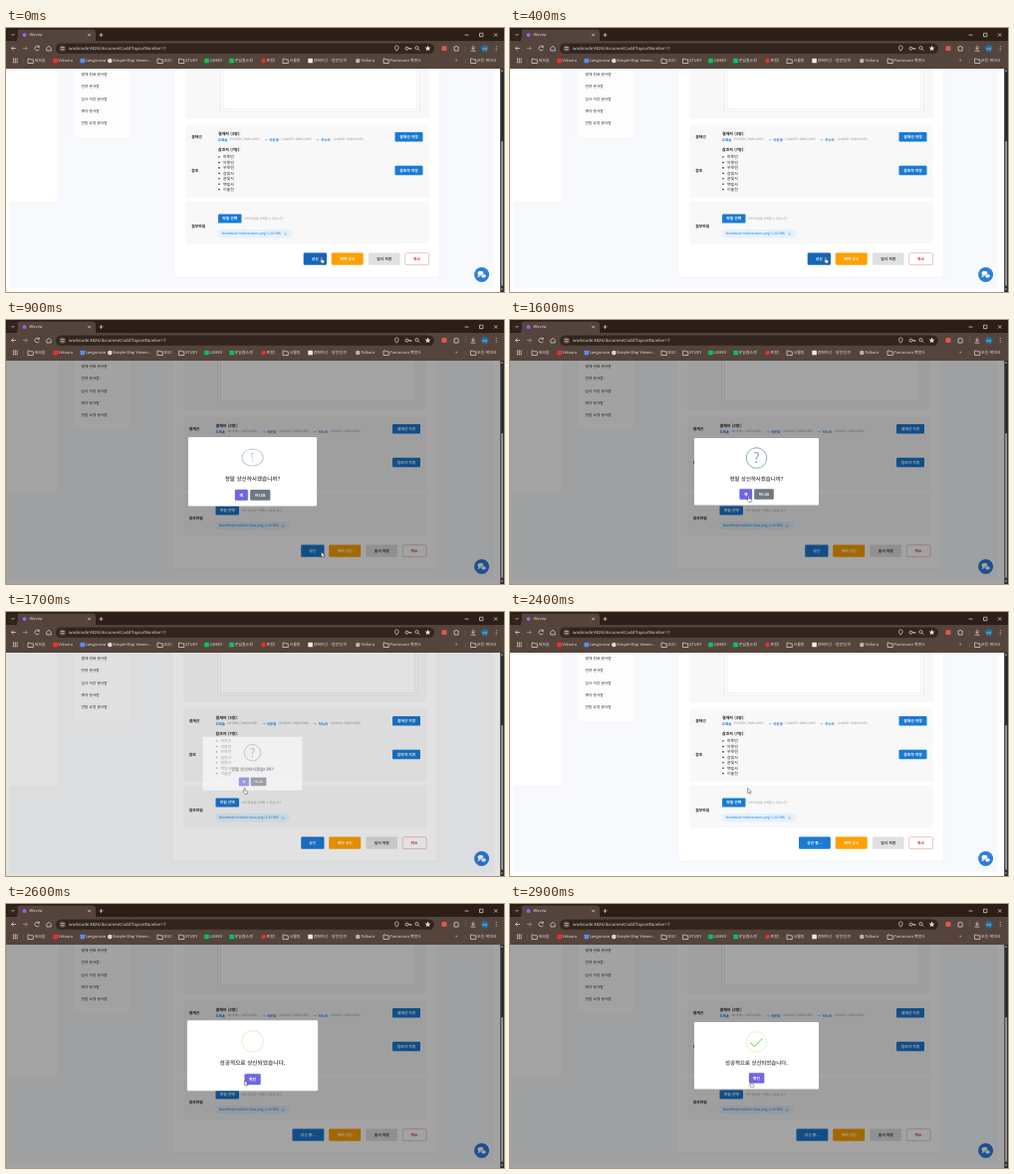
Recreate the animation shown at these times as an HTML page. Size 500 by 266 pixels, loop 3 s.

```html
<!DOCTYPE html>
<html lang="ko">
<head>
<meta charset="utf-8">
<style>
  html, body { margin: 0; width: 100%; height: 100%; overflow: hidden; background: #fff; }
  svg { display: block; width: 500px; height: 266px; }
  text {
    font-family: "Noto Sans CJK KR", "Noto Sans", sans-serif;
    text-rendering: geometricPrecision;
    white-space: pre;
  }
</style>
</head>
<body>
<svg id="stage" viewBox="0 0 500 266"></svg>
<script>
const BLUE = '#1a7ad4', PURPLE = '#7066e0', INK = '#e4dedb', CARD = '#f8f8f9';
const STRIP = '#2d1f18', TOOLBAR = '#54443c', FIELD = '#32251f';
const DIM = .36;

const rect = (x, y, w, h, fill, extra = '') =>
  `<rect x="${x}" y="${y}" width="${w}" height="${h}" fill="${fill}" ${extra}/>`;
const circle = (x, y, r, fill, extra = '') =>
  `<circle cx="${x}" cy="${y}" r="${r}" fill="${fill}" ${extra}/>`;
const line = (d, color = INK, width = .7, extra = '') =>
  `<path d="${d}" fill="none" stroke="${color}" stroke-width="${width}" ${extra}/>`;
// y is the vertical middle of the text
const text = (x, y, s, size, fill, extra = '') =>
  `<text x="${x}" y="${y + size * .36}" font-size="${size}" fill="${fill}" ${extra}>${s}</text>`;
const bold = 'font-weight="700"', mid = 'text-anchor="middle"';
const button = (x, y, w, h, label, fill, color = '#fff', extra = '') =>
  rect(x, y, w, h, fill, 'rx="1" ' + extra) +
  text(x + w / 2, y + h / 2, label, 3.8, color, `${mid} ${bold}`);
const group = (id, content) => `<g id="${id}">${content}</g>`;

function browser() {
  const mark = (x, label, color, round) =>
    (color ? rect(x, 30.7, 4.6, 4.6, color, `rx="${round ? 2.3 : .6}"`)
           : line(`M${x} 31h2l.7 .8h2.6v3.7h-5.3z`)) +
    text(x + (color ? 5.2 : 6.5), 33, label, 4, INK);
  return rect(0, 0, 500, 14, STRIP) +
    rect(11, 1.5, 79, 14, TOOLBAR, 'rx="3"') +
    rect(0, 13, 500, 28, TOOLBAR) +
    rect(2, 2, 10, 9.5, FIELD, 'rx="3"') + line('M5.5 6l1.5 1.5 1.5-1.5') +
    circle(18.5, 7, 2, '#a35cf5') + text(23.5, 7, 'Wovea', 4.1, INK) +
    line('M82.3 5.8l2.4 2.4m0-2.4l-2.4 2.4M93.5 7h4m-2-2v4') +
    line('M460.5 7h4M475.5 5.2h3.4v3.4h-3.4zM490 5.2l3.4 3.4m0-3.4l-3.4 3.4') +
    line('M10 20.5H5.5m2-2l-2 2 2 2') + line('M17 20.5h4.5m-2-2l2 2-2 2', '#a89b95') +
    line('M33 19a2.3 2.3 0 1 0 .3 2.4M33.3 17.6v1.8h-1.8M40.8 20.3l2.2-2 2.2 2v2.6h-4.4z') +
    rect(50, 15.4, 380, 10.4, FIELD, 'rx="5.2"') +
    circle(56.7, 20.6, 3.4, TOOLBAR) + line('M54.8 19.6h3.8M54.8 21.7h3.8') +
    text(63, 20.7, 'worknode:4826/document/add?layoutNumber=7', 4.25, INK) +
    line('M392.3 23.2c-3-3.5-1.8-5.3 0-5.3s3 1.8 0 5.3zM404 20.6h3v1.2m-1.2-1.2v1') +
    circle(402.5, 20.6, 1.5, 'none', `stroke="${INK}" stroke-width=".8"`) +
    circle(412.5, 20, 1.6, 'none', `stroke="${INK}" stroke-width=".7"`) + line('M413.7 21.2l1.7 1.7') +
    `<path d="M423.5 17.6l.8 2 2.1.1-1.6 1.3.5 2.1-1.8-1.2-1.8 1.2.5-2.1-1.6-1.3 2.1-.1z" fill="${INK}"/>` +
    rect(437.5, 18, 5, 5, '#e05454', 'rx="1"') +
    line('M450 19h1.2a.9 .9 0 0 1 1.8 0h1.2v4h-4.2z') +
    line('M461.2 18v5', '#8b7b73', .4) +
    line('M469 17.8v3.4m-1.7-1.5l1.7 1.7 1.7-1.7M466.6 23h4.8', INK, .8) +
    circle(480.6, 20.6, 3.7, '#246c99') + text(480.6, 20.6, '소담', 2.8, '#fff', mid) +
    [18.5, 20.5, 22.5].map(y => circle(492.2, y, .5, INK)).join('') +
    [0, 1, 2, 3, 4, 5, 6, 7, 8].map(i => rect(7 + i % 3 * 1.8, 30.5 + (i / 3 | 0) * 1.8, 1.1, 1.1, INK)).join('') +
    line('M17 31v4.5M461.3 31v4.5', '#8b7b73', .4) +
    mark(22, '새모음') + mark(47.3, 'Vidoora', '#f03030') + mark(74.5, 'Langonova', '#5b8def') +
    mark(102, 'Simple Map Viewer...', '#d9d9d9', 1) + mark(152, 'DOC') + mark(173.5, 'STUDY') +
    mark(199.2, 'LUMEV', '#03c75a') + mark(224.3, '온담결쇼핑', '#03c75a') +
    mark(256.3, '토랑)', '#e8322e', 1) + mark(278, '크롤링') + mark(303.3, '경매자산 - 일반검색', '#f1eeea') +
    mark(351, 'Talkora', '#b9b4b1', 1) + mark(379, 'Funmoora 백엔드') +
    text(451, 32.6, '»', 5, INK) + mark(466.5, '모든 북마크');
}

function backdropPage() {
  const menu = ['결재 완료 문서함', '반려 문서함', '임시 저장 문서함', '예약 문서함', '연람 요청 문서함'];
  return rect(0, 40, 500, 226, '#fff') + rect(3, 40, 487, 222, '#f8f9fc') +
    rect(0, 40, 52, 135, '#fff') +
    rect(67, 38, 59, 73, '#fdfdfd', 'stroke="#eceff3" stroke-width=".4"') +
    menu.map((s, i) => text(75.5, 46.8 + i * 12.3, s, 3.75, '#333')).join('');
}

function formPanel() {
  const approvers = [[213, '도해솔', 'INTERN'], [264.5, '라온빛', 'JUNIOR'], [316.3, '차누리', 'JUNIOR']];
  const readers = ['마루빈', '아루빈', '우루빈', '감빛사', '윤빛사', '백빛사', '이솔찬'];
  const blue = '#1976d2';
  const card = (y, h) => rect(180.5, y, 244, h, CARD, 'rx="1.5"');
  return rect(169, 38, 266.5, 212.5, '#fff', 'stroke="#edf0f4" stroke-width=".6"') +
    card(38, 53) + card(97.5, 73.5) + card(174.5, 43) +
    rect(215.5, 38, 200, 46, '#fff') +
    line('M215.5 40V84h200V40M218 40v41.8h195V40', '#dcdcdc', .5) +
    text(186.3, 109.8, '결재선', 3.8, '#222', bold) +
    text(186.3, 143.7, '참조', 3.8, '#222', bold) +
    text(186.3, 199.3, '첨부파일', 3.8, '#222', bold) +
    text(213, 106.8, '결재자 (3명):', 4, '#222', bold) +
    text(213, 123, '참조자 (7명):', 4, '#222', bold) +
    approvers.map(([x, name, rank], i) =>
      text(x, 112.4, name, 3.4, blue, bold) +
      text(x + 11.6, 112.4, `(${rank} / EMPLOYEE)`, 3, '#8a8f96') +
      (i < 2 ? text(x + 46.3, 112.4, '→', 3.4, blue) : '')).join('') +
    readers.map((name, i) =>
      circle(214, 130 + i * 5.45, .8, '#222') + text(218, 130 + i * 5.45, name, 3.95, '#222')).join('') +
    button(390.5, 105, 28, 9.5, '결재선 지정', BLUE) +
    button(390.5, 138.7, 28, 9.5, '참조자 지정', BLUE) +
    button(213, 187.5, 23.5, 9, '파일 선택', BLUE) +
    text(239, 192, '여러 파일을 선택할 수 있습니다', 3, '#999') +
    rect(213, 203, 74, 8.5, '#e3f2fd', 'rx="4"') +
    text(216.5, 207.3, 'thumbnail-mellow-dune.png (1.42 MB)', 3.3, blue) +
    text(278.5, 207.2, '×', 4, '#777') +
    group('submit', '') +
    button(326.7, 226.5, 32, 12.3, '예약 상신', '#ffa000') +
    button(364, 226.5, 31.5, 12.3, '임시 저장', '#e0e0e0', '#333') +
    button(400.7, 226.7, 23.8, 11.9, '취소', '#fff', '#d32f2f', 'stroke="#dc8f8f" stroke-width=".5"');
}

const chatButton = circle(477.6, 248.5, 7.5, '#2d7de0') +
  rect(473.6, 245, 5.8, 4.4, '#fff', 'rx="1.8"') + line('M475 249l-1.2 1.7 2.7-1.3', '#fff', .8) +
  rect(477, 248, 5, 3.8, '#fff', 'rx="1.7" stroke="#2d7de0" stroke-width=".6"');

const scrollbar = rect(496.2, 40, 3.8, 226, '#2c2c2c') +
  rect(497.2, 114, 1.9, 146, '#9a9a9a', 'rx=".9"') +
  '<path d="M498.1 41.8l1.3 2h-2.6zM498.1 264.5l1.3-2h-2.6z" fill="#9a9a9a"/>';

const title = s => text(247.5, 160, s, 5.4, '#545454', `${mid} ${bold}`);
const focusRing = 'stroke="#7066e0" stroke-opacity=".35" stroke-width=".8"';
const askBox = title('정말 상신하시겠습니까?') +
  button(230.5, 170.3, 12.5, 10.5, '예', PURPLE, '#fff', focusRing) +
  button(245.2, 170.3, 19.6, 10.5, '아니요', '#6e7881') +
  group('askIcon', circle(247.5, 139, 10.3, 'none', 'stroke="#87adbd" stroke-width="1"') +
    group('askMark', text(247.5, 139, '?', 14.6, '#87adbd', mid)));
const doneBox = title('성공적으로 상신되었습니다.') +
  button(240, 170.3, 15.2, 10.3, '확인', PURPLE, '#fff', focusRing) +
  circle(247.5, 139, 10.2, 'none', 'stroke="#a5dc86" stroke-opacity=".35" stroke-width="1"') +
  line('M241.3 139.7l4 4 8.2-8.3', '#a5dc86', 1.3,
    'id="check" pathLength="1" stroke-dasharray="1 2" stroke-linecap="round"');

const arrow = '<path d="M0 0v5.2l1.2-1.1.9 1.9 1-.5-.9-1.8h1.6z" fill="#fff" stroke="#222" stroke-width=".4"/>';
const hand = '<path d="M.4.3c.5-.5 1.1-.1 1.1.5v1.8l2 .6c.5.2.6.6.5 1.1l-.5 1.9h-2.3l-1.7-2.2c-.1-.6.5-.7.9-.3z" fill="#fff" stroke="#222" stroke-width=".4"/>';

const $ = id => document.getElementById(id);
$('stage').innerHTML = backdropPage() + group('panel', formPanel()) + chatButton +
  rect(0, 40, 496.2, 226, '#000', 'id="shade"') +
  group('popup', rect(185, 119, 125, 67.5, '#fff', 'rx="1.2"') + group('ask', askBox) + group('done', doneBox)) +
  scrollbar + browser() + group('cursor', group('arrow', arrow) + group('hand', hand));

const clamp = v => Math.min(1, Math.max(0, v));
const mix = (a, b, p) => a + (b - a) * p;
// CSS "ease": cubic-bezier(.25, .1, .25, 1)
function ease(x) {
  if (x <= 0 || x >= 1) return clamp(x);
  let lo = 0, hi = 1, u;
  for (let i = 0; i < 20; i++) {
    u = (lo + hi) / 2;
    if (.75 * u * (1 - u) + u ** 3 < x) lo = u; else hi = u;
  }
  return .3 * u * (1 - u) ** 2 + 3 * u * u * (1 - u) + u ** 3;
}
function showScale(age) {
  const p = clamp(age / 300);
  if (p < .45) return mix(.7, 1.05, ease(p / .45));
  if (p < .8) return mix(1.05, .95, ease((p - .45) / .35));
  return mix(.95, 1, ease((p - .8) / .2));
}
const place = (id, sx, sy, x, y) => $(id).setAttribute('transform', `matrix(${sx} 0 0 ${sy} ${x} ${y})`);
const scaleAt = (id, sx, sy, cx, cy) => place(id, sx, sy, cx * (1 - sx), cy * (1 - sy));
const fade = (id, v) => $(id).setAttribute('opacity', v);
const show = (id, on) => $(id).setAttribute('display', on ? 'inline' : 'none');

function drawPopup(t) {
  const done = t >= 2500, open = done || (t >= 900 && t < 1800);
  const age = t - (done ? 2466 : 750), closing = done ? 0 : clamp((t - 1640) / 150);
  show('popup', open);
  show('ask', !done);
  show('done', done);
  fade('shade', open ? DIM * ease(age / 100) * (1 - ease(closing)) : 0);
  fade('popup', 1 - closing);
  const scale = showScale(age) * mix(1, .5, closing);
  scaleAt('popup', scale, scale, 247.5, 152.75);

  const flip = ease((age + 35) / 500), spin = ease((age + 35) / 800);
  scaleAt('askIcon', 1, Math.cos(mix(100, 0, flip) * Math.PI / 180), 247.5, 139);
  fade('askIcon', flip);
  scaleAt('askMark', Math.cos(2 * Math.PI * spin), 1, 247.5, 139);
  const drawn = clamp((t - 2600) / 250);
  $('check').setAttribute('stroke-dashoffset', 1 - drawn);
  show('check', drawn > 0);
}

function drawCursor(t) {
  const press = clamp((t - 600) / 200), travel = ease((t - 1000) / 500), nudge = clamp((t - 2500) / 300);
  place('cursor', 1, 1, mix(mix(315.8, 316.5, press), 238.6, travel) + 2.4 * nudge,
    mix(mix(230.8, 233.7, press), 177.3, travel) + 1.3 * nudge);
  const pointing = t < 800 || (t >= 1500 && t < 1800) || t >= 2700;
  show('hand', pointing);
  show('arrow', !pointing);
}

function draw(t) {
  const locked = (t >= 800 && t < 1800) || t >= 2500;
  place('panel', 1, 1, locked ? -2.5 : 0, 0);
  const fill = t < 800 ? '#1565b8' : t < 900 ? '#0d4f96' : BLUE;
  $('submit').innerHTML = t < 1800
    ? button(298.7, 226.5, 23.3, 12.3, '상신', fill)
    : button(290, 226.5, 31.8, 12.3, '상신 중...', BLUE);
  drawPopup(t);
  drawCursor(t);
}

const start = performance.now();
function tick() {
  draw(Math.floor((performance.now() - start) % 3000 / 100) * 100);
  requestAnimationFrame(tick);
}
tick();
</script>
</body>
</html>
```
